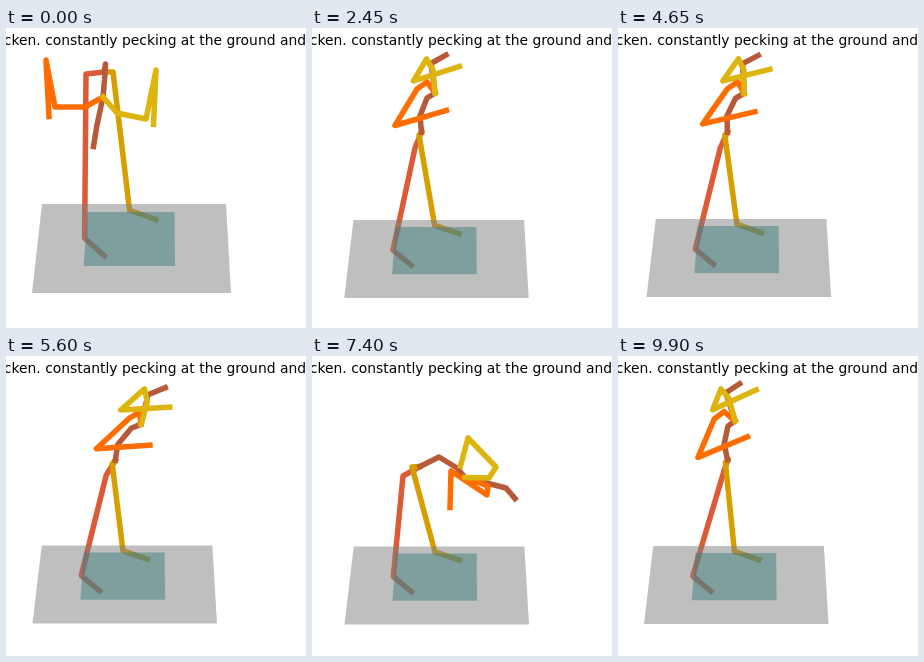
An HTML page for the animation above (9950 ms loop, 300x300 px).

```html
<!DOCTYPE html>
<html>
<head>
<meta charset="utf-8">
<style>
  html, body { margin: 0; width: 100%; height: 100%; overflow: hidden; background: #fff; }
  svg { display: block; width: 300px; height: 300px; }
  text { font: 13.89px "DejaVu Sans", sans-serif; text-anchor: end; }
  polyline { fill: none; stroke-width: 5.5; stroke-linecap: square; stroke-linejoin: round; }
  polygon { fill-opacity: .5; }
</style>
</head>
<body>
<svg viewBox="0 0 300 300">
  <text x="300" y="17">chicken. constantly pecking at the ground and</text>
  <g id="figure"></g>
</svg>
<script>
const LOOP = 9950, STEP = 50, TURN = 2 * Math.PI;

// Joints: root, two hips, five up the spine, four along each arm.
const PARENT = [, 0, 0, 0, 3, 4, 5, 6, 5, 8, 9, 10, 5, 12, 13, 14];
const SPINE = [0, 3, 4, 5, 6, 7], RIGHT_ARM = [5, 8, 9, 10, 11], LEFT_ARM = [5, 12, 13, 14, 15];

const lerp = (a, b, u) => a + (b - a) * u;
const lerpAll = (a, b, u) => a.map((v, i) => lerp(v, b[i], u));

// Joint positions become bones with an angle and a length, so that limbs swing.
function pose(floorWidth, floorDepth, ...joints) {
  const bones = joints.slice(1).map(([x, y], i) => {
    const [px, py] = joints[PARENT[i + 1]];
    return { angle: Math.atan2(y - py, x - px), length: Math.hypot(x - px, y - py) };
  });
  return { root: joints[0], floor: [0, 0, floorWidth, floorDepth], bones };
}

function mix(a, b, u) {
  const bones = a.bones.map((bone, i) => {
    const raw = (b.bones[i].angle - bone.angle) / TURN;
    return {
      angle: bone.angle + (raw - Math.round(raw)) * TURN * u,
      length: lerp(bone.length, b.bones[i].length, u)
    };
  });
  return { root: lerpAll(a.root, b.root, u), floor: lerpAll(a.floor, b.floor, u), bones };
}

const raised = pose(199, 89, [98, 44], [80, 46], [107, 44],
  [99.5, 36], [98.5, 52], [97, 69], [91, 97], [87.5, 118.5],
  [79, 79], [49, 79], [40, 32], [43, 88.5],
  [111, 85], [140, 91], [150, 42], [147.5, 96.5]);
const spread = pose(185, 90, [109, 59], [94, 66], [118, 60],
  [112, 45], [115, 57], [113, 61.5], [118, 60], [118.5, 70],
  [100, 58], [76, 59], [43.5, 41], [61.5, 89],
  [133, 59], [160, 56], [167, 30], [171.5, 80.5]);
const upright = pose(184.5, 78, [109.5, 104], [103, 120], [107, 107],
  [108, 88], [115, 70], [123, 65], [119, 35.5], [134, 27],
  [115, 54], [105, 61], [83, 97.5], [134.5, 82.5],
  [121, 42], [114.5, 31], [101.5, 53], [147.5, 38.5]);
const tilted = pose(184.5, 78, [109, 105], [96, 118], [105, 109],
  [117, 91], [139, 82], [151.5, 80], [173, 58], [193.5, 54],
  [157, 72], [146, 77], [101, 92], [153, 106],
  [168, 64], [172, 50.5], [132, 61], [180, 76.5]);
const bent = pose(184.5, 78, [108, 110.5], [91, 120], [100, 111],
  [127, 101], [145, 112], [153, 121.5], [194, 132], [203, 142.5],
  [176, 130], [175, 139], [139, 115], [138, 151.5],
  [177, 122], [184, 111], [156, 82], [148.5, 110]);

// 0 is upright, 1 tilted, 2 bent to the ground.
const lean = n => n < 1 ? mix(upright, tilted, n) : mix(tilted, bent, n - 1);

const key = (time, body, left, bottom) =>
  ({ time, ...body, floor: [left, bottom, ...body.floor.slice(2)] });

const keys = [
  key(0, raised, 26, 265), key(1300, spread, 40, 270),
  key(2050, lean(0), 32, 270), key(3750, lean(0), 33.5, 270), key(4700, lean(.1), 28.5, 269),
  key(5600, lean(.4), 26.5, 267.5), key(6000, lean(1.25), 36.5, 270),
  key(6550, lean(2), 43, 271.5), key(7400, lean(2), 32.5, 268.5),
  key(7900, lean(1.9), 26.5, 268), key(8200, lean(1.3), 26, 268),
  key(8650, lean(1), 33, 268.5), key(9350, lean(-.15), 22.5, 267.5),
  key(9900, lean(-.2), 26, 268)
];

function shapes({ root, floor: [left, bottom, width, depth], bones }) {
  const joints = [root];
  bones.forEach(({ angle, length }, i) => {
    const [x, y] = joints[PARENT[i + 1]];
    joints.push([x + length * Math.cos(angle), y + length * Math.sin(angle)]);
  });
  const onFloor = (u, d) =>
    [left + width * (.05 * d + u * (1 - .075 * d)), bottom - depth * d];
  const area = (u0, u1, d0, d1) =>
    [onFloor(u0, d0), onFloor(u1, d0), onFloor(u1, d1), onFloor(u0, d1)];
  const leg = (hip, ankle, toe) => [root, hip, lerpAll(hip, ankle, .5), ankle, toe];
  const chain = list => list.map(i => joints[i]);
  return [
    leg(joints[1], onFloor(.245, .615), onFloor(.353, .42)),
    leg(joints[2], onFloor(.477, .93), onFloor(.62, .825)),
    chain(SPINE), chain(RIGHT_ARM), chain(LEFT_ARM),
    area(0, 1, 0, 1), area(.25, .72, .303, .91)
  ];
}

function add(tag, attribute, color) {
  const node = document.createElementNS("http://www.w3.org/2000/svg", tag);
  node.setAttribute(attribute, color);
  return document.getElementById("figure").appendChild(node);
}
const nodes = [
  ...["#dd5a37", "#d69e00", "#b75a39", "#ff6d00", "#ddb50e"].map(c => add("polyline", "stroke", c)),
  ...["#808080", "#408080"].map(c => add("polygon", "fill", c))
];

function draw(now) {
  const time = Math.floor(now % LOOP / STEP) * STEP;
  const next = Math.max(1, keys.findIndex(k => k.time >= time));
  const a = keys[next - 1], b = keys[next];
  const u = (time - a.time) / (b.time - a.time);
  const points = shapes(mix(a, b, u * u * (3 - 2 * u)));
  nodes.forEach((node, i) => node.setAttribute("points", points[i].join(" ")));
}

const start = performance.now();
function tick() {
  draw(performance.now() - start);
  requestAnimationFrame(tick);
}
tick();
</script>
</body>
</html>
```
